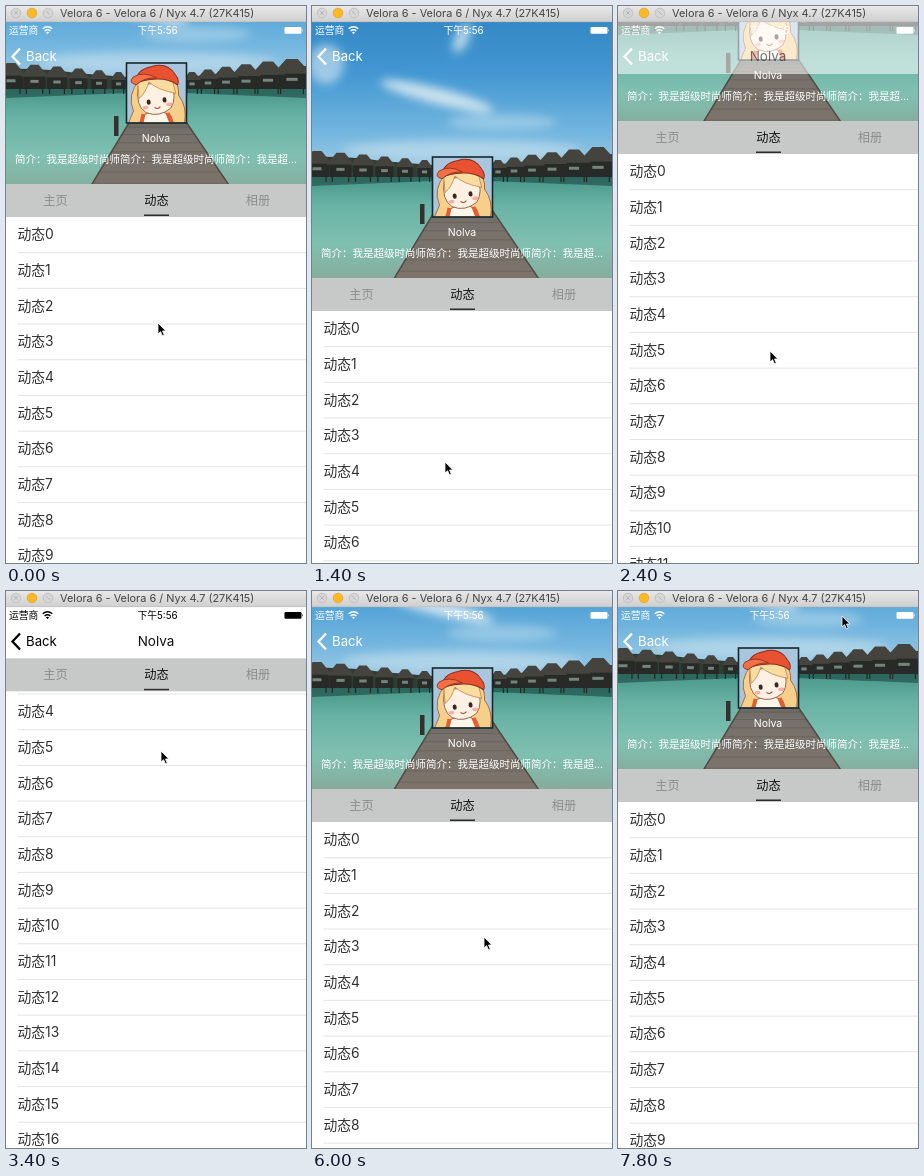
Animation of 300 by 557 pixels, one loop 8000 ms. Source, as an HTML page:

```html
<!DOCTYPE html>
<html lang="zh">
<head>
<meta charset="utf-8">
<title>Profile scroll</title>
<style>
html, body { margin: 0; width: 100%; height: 100%; overflow: hidden; background: #fff; }
svg { display: block; width: 100vw; height: 100vh; }
text { font-family: Inter, "Noto Sans CJK SC", "Noto Sans CJK", sans-serif; }
.mid { text-anchor: middle; }
.row { font-size: 13.8px; fill: #303030; }
.tab { font-size: 12.2px; text-anchor: middle; }
</style>
</head>
<body>
<svg viewBox="0 0 300 557" preserveAspectRatio="none">
  <defs>
    <linearGradient id="chrome" x2="0" y2="1"><stop stop-color="#e9e8e9"/><stop offset="1" stop-color="#d0cfd0"/></linearGradient>
    <linearGradient id="sky" x2="0" y2="1">
      <stop stop-color="#2b80bd"/><stop offset=".45" stop-color="#4297d2"/><stop offset=".75" stop-color="#70b4de"/><stop offset="1" stop-color="#a9d0e4"/>
    </linearGradient>
    <linearGradient id="sea" x2="0" y2="1">
      <stop stop-color="#48968a"/><stop offset=".18" stop-color="#68b3a5"/><stop offset=".42" stop-color="#80c0b1"/><stop offset=".65" stop-color="#87ab9b"/><stop offset="1" stop-color="#8aa392"/>
    </linearGradient>
    <linearGradient id="wood" x2="0" y2="1"><stop stop-color="#575550"/><stop offset=".45" stop-color="#76716a"/><stop offset="1" stop-color="#7d746b"/></linearGradient>
    <filter id="soft" x="-30%" y="-60%" width="160%" height="220%"><feGaussianBlur stdDeviation="5"/></filter>
    <clipPath id="photoClip"><rect id="photoBox" y="16" width="300"/></clipPath>
    <clipPath id="portraitClip"><rect width="60" height="60"/></clipPath>
  </defs>
  <rect width="300" height="557" fill="#fff"/>
  <g id="list"></g>

  <g clip-path="url(#photoClip)">
    <g id="photo">
      <rect y="-190" width="300" height="192" fill="url(#sky)"/>
      <g filter="url(#soft)" fill="#e9f2f6">
        <ellipse cx="125" cy="-80" rx="58" ry="8" opacity=".8" transform="rotate(14 125 -80)"/>
        <ellipse cx="150" cy="-138" rx="7" ry="16" opacity=".7" transform="rotate(25 150 -138)"/>
        <ellipse cx="14" cy="-112" rx="18" ry="20" opacity=".55"/>
        <ellipse cx="190" cy="-54" rx="55" ry="8" opacity=".35"/>
        <ellipse cx="150" cy="-26" rx="120" ry="10" opacity=".4"/>
      </g>
      <path d="M0 4V-19Q35-20 70-15L120-11 150-8 182-11Q230-17 262-19L300-22V4Z" fill="#303d32"/>
      <rect y="1" width="300" height="160" fill="url(#sea)"/>
      <path d="M0 1H300V10L180 5H120L0 10Z" fill="#1c4740" opacity=".6"/>
      <g id="huts"></g>
      <path d="M144 0H157L229 106H80Z" fill="url(#wood)"/>
      <path id="planks" stroke="#45413c" stroke-width=".8" opacity=".35"/>
      <path d="M144 0 80 106M157 0 229 106" stroke="#514b43" stroke-width="1.500"/>
      <path d="M108 28h4.500v20h-4.500zM131 8h2.500v12h-2.500zM168 8h2.500v12h-2.500z" fill="#33312d"/>
    </g>
    <g id="profile">
      <g transform="translate(120.500 -121)">
        <g clip-path="url(#portraitClip)">
          <rect width="60" height="60" fill="#a9c6df"/>
          <path d="M13 17Q0 32 7 48L2 60H58Q61 44 52 32 53 22 46 14Z" fill="#f6d08a" stroke="#a86e3a"/>
          <path d="M17 52Q30 45 44 52L47 60H13Z" fill="#fff6ea" stroke="#bd5c38"/>
          <path d="M17 51 15 60M41 50 45 60" stroke="#e45d32" stroke-width="4"/>
          <g transform="rotate(-8 30 30)">
            <path d="M13 20Q7 40 17 48 29 55 42 47 50 38 46 20Z" fill="#fff0e4" stroke="#80513a" stroke-width=".8"/>
            <path d="M12 33Q19 29 24 18 31 27 49 33L47 15 13 16Z" fill="#f9dca0" stroke="#b97c40" stroke-width=".7"/>
            <path d="M11 18Q12 4 29 3 45 1 51 14 55 20 52 25 44 17 29 16 17 15 11 18Z" fill="#e95230" stroke="#8b2e20"/>
            <path d="M11 19Q3 16 9 11 20 6 32 15 20 13 11 19Z" fill="#f37045" stroke="#8b2e20" stroke-width=".8"/>
            <ellipse cx="21" cy="38" rx="2" ry="2.600" fill="#392923"/><ellipse cx="37" cy="38" rx="2" ry="2.600" fill="#392923"/>
            <ellipse cx="17" cy="43" rx="3" ry="1.800" fill="#f8aea0"/><ellipse cx="41" cy="43" rx="3" ry="1.800" fill="#f8aea0"/>
            <path d="M26 44Q29 47 32 44" fill="none" stroke="#a34235"/>
          </g>
        </g>
        <rect width="60" height="60" fill="none" stroke="#14282e" stroke-width="1.600"/>
      </g>
      <g fill="#fff">
        <text class="mid" x="150" y="-42.300" font-size="10.500">Nolva</text>
        <text x="9" y="-21.300" font-size="10.500">简介：我是超级时尚师简介：我是超级时尚师简介：我是超...</text>
      </g>
    </g>
  </g>

  <rect id="navFill" y="16" width="300" height="52" fill="#fff"/>
  <g id="tabs">
    <rect width="300" height="33" fill="#c7c8c8"/>
    <rect id="underline" y="30.500" width="25" height="1.500" fill="#2c2c2a"/>
  </g>
  <text id="navTitle" class="mid" x="150" y="55" font-size="13.500" fill="#111">Nolva</text>
  <g id="bar">
    <text x="3" y="27.700" font-size="9.800">运营商</text>
    <text class="mid" x="151.500" y="27.700" font-size="9.800">下午5:56</text>
    <path d="M36.700 22.800Q41.500 18.600 46.300 22.800M38.600 25Q41.500 22.500 44.400 25" fill="none" stroke="currentColor" stroke-width="1.400"/>
    <path d="M39.900 26.300Q41.500 25 43.100 26.300L41.500 28.200Z"/>
    <rect x="278.500" y="21" width="17" height="6.700" rx="1.200"/>
    <path d="M296.200 23q1.500 1.300 0 2.700z"/>
    <path d="M14 42.500 6.500 50.500 14 58.500" fill="none" stroke="currentColor" stroke-width="2.300"/>
    <text x="20" y="55" font-size="13.200">Back</text>
  </g>

  <rect width="300" height="16" fill="url(#chrome)"/>
  <path d="M0 15.700H300" stroke="#b9b9b9" stroke-width=".6"/>
  <g stroke-width=".7">
    <circle cx="10" cy="7" r="4.800" fill="#d7d6d7" stroke="#b9b8b9"/>
    <circle cx="26" cy="7" r="4.800" fill="#fdb924" stroke="#dda02b"/>
    <circle cx="42" cy="7" r="4.800" fill="#d7d6d7" stroke="#b9b8b9"/>
    <path d="M8.300 5.300 11.700 8.700M11.700 5.300 8.300 8.700M40.300 5.300 43.700 8.700" stroke="#a9a8a9"/>
  </g>
  <text x="54" y="11" font-size="10.900" fill="#454545">Velora 6 - Velora 6 / Nyx 4.7 (27K415)</text>
  <path id="cursor" d="M0 0V11L2.600 8.700 4.400 12.800 6.300 12 4.500 8H7.800Z" fill="#000" stroke="#fff" stroke-width=".8"/>
</svg>
<script>
const LOOP = 8000, STEP = 200;
const REST = 178, PINNED = 67.3, ROW = 35.68, ROWS = 20;
const LABELS = ["主页", "动态", "相册"];
const TAB_X = [49.5, 150.5, 252];

// Keyframes: time, then values
const headerTrack = [[0, REST], [1400, 272], [1600, 228], [1800, 181], [2000, REST], [2400, 115],
  [2800, PINNED], [5400, PINNED], [6000, 198], [6400, 184], [6800, 178.7], [7000, REST]];
const scrollTrack = [[2800, 0], [3400, 140], [3700, 140], [4400, 0]];
const cursorTrack = [[0, 152, 317], [1400, 133, 456], [1600, 134, 456], [2000, 152, 408], [2400, 152, 345],
  [2800, 152, 297], [3400, 155, 160], [3700, 158, 165], [4300, 175, 285], [4600, 240, 86],
  [4800, 235, 101], [5200, 152, 84], [5400, 160, 200], [6000, 172, 346], [6800, 220, 89], [7800, 224, 25]];

const $ = id => document.getElementById(id);
const add = (parent, tag, attrs, content = "") => {
  const node = document.createElementNS("http://www.w3.org/2000/svg", tag);
  for (const key in attrs) node.setAttribute(key, attrs[key]);
  node.textContent = content;
  return parent.appendChild(node);
};
const move = (id, x, y) => $(id).setAttribute("transform", `translate(${x} ${y})`);

function sample(track, time) {
  const next = track.findIndex(key => key[0] > time);
  if (next === 0) return track[0].slice(1);
  if (next < 0) return track[track.length - 1].slice(1);
  const a = track[next - 1], b = track[next];
  const p = (time - a[0]) / (b[0] - a[0]);
  return a.slice(1).map((value, i) => value + (b[i + 1] - value) * p);
}

const rows = Array.from({ length: ROWS }, (_, i) => {
  add($("list"), "path", { d: `M11.5 ${(i + 1) * ROW}H300`, stroke: "#dddde0", "stroke-width": .8 });
  return add($("list"), "text", { class: "row", x: 11.5, y: i * ROW + 22.3 });
});
const tabs = LABELS.map((label, i) => add($("tabs"), "text", { class: "tab", x: TAB_X[i], y: 20.5 }, label));

function addHut(x, width, height) {
  const eaves = -height * .5, half = width / 2;
  const hut = (d, attrs) => add($("huts"), "path", { d, ...attrs });
  hut(`M${x - half * .8} ${eaves}h${width * .8}V1h${-width * .8}z`, { fill: "#272a27" });
  hut(`M${x - half * .3} ${-height}h${half * .6}L${x + half} ${eaves}H${x - half}Z`, { fill: "#45433e" });
  hut(`M${x - half * .3} ${eaves * .7}h${half * .6}v3h${-half * .6}z`, { fill: "#75847c" });
  hut(`M${x - half * .6} 0v6M${x + half * .6} 0v6`, { stroke: "#232723", "stroke-width": 1.2 });
}
for (let i = 0; i < 6; i++) {
  addHut(5 + i * 24 - i * i * .5, 30 - i * 2.6, 25 - i * 1.8);
  addHut(286 - i * 25 + i * i, 38 - i * 4, 29 - i * 2.6);
}
$("planks").setAttribute("d", Array.from({ length: 17 }, (_, i) => {
  const y = 3 + i * i * .36;
  return `M${144 - y * .6} ${y}H${157 + y * .68}`;
}).join(""));

function draw(time) {
  const [top] = sample(headerTrack, time);
  const [scroll] = sample(scrollTrack, time);
  const pull = top - REST;
  const alpha = Math.min(1, Math.max(0, -pull / (REST - PINNED)));
  const active = time >= 4600 && time < 5200 ? 2 : 1;
  const ink = alpha > .99 ? "#000" : "#fff";

  $("photoBox").setAttribute("height", top - 16);
  // The photo stays centred until its full height shows, then follows the edge
  move("photo", 0, 82 + pull - Math.min(6, Math.max(0, pull / 2)));
  move("profile", 0, top);
  move("tabs", 0, top);
  move("list", 0, top + 33 - scroll);
  move("cursor", ...sample(cursorTrack, time));

  $("navFill").setAttribute("opacity", alpha);
  $("navTitle").setAttribute("opacity", alpha);
  $("bar").setAttribute("fill", ink);
  $("bar").setAttribute("color", ink);
  $("underline").setAttribute("x", TAB_X[active] - 12.5);
  tabs.forEach((tab, i) => tab.setAttribute("fill", i === active ? "#111" : "#8d8e8c"));
  rows.forEach((row, i) => row.textContent = LABELS[active] + i);
}

const start = performance.now();
function tick() {
  const time = (performance.now() - start) % LOOP;
  draw(Math.floor(time / STEP) * STEP);
  requestAnimationFrame(tick);
}
tick();
</script>
</body>
</html>
```
